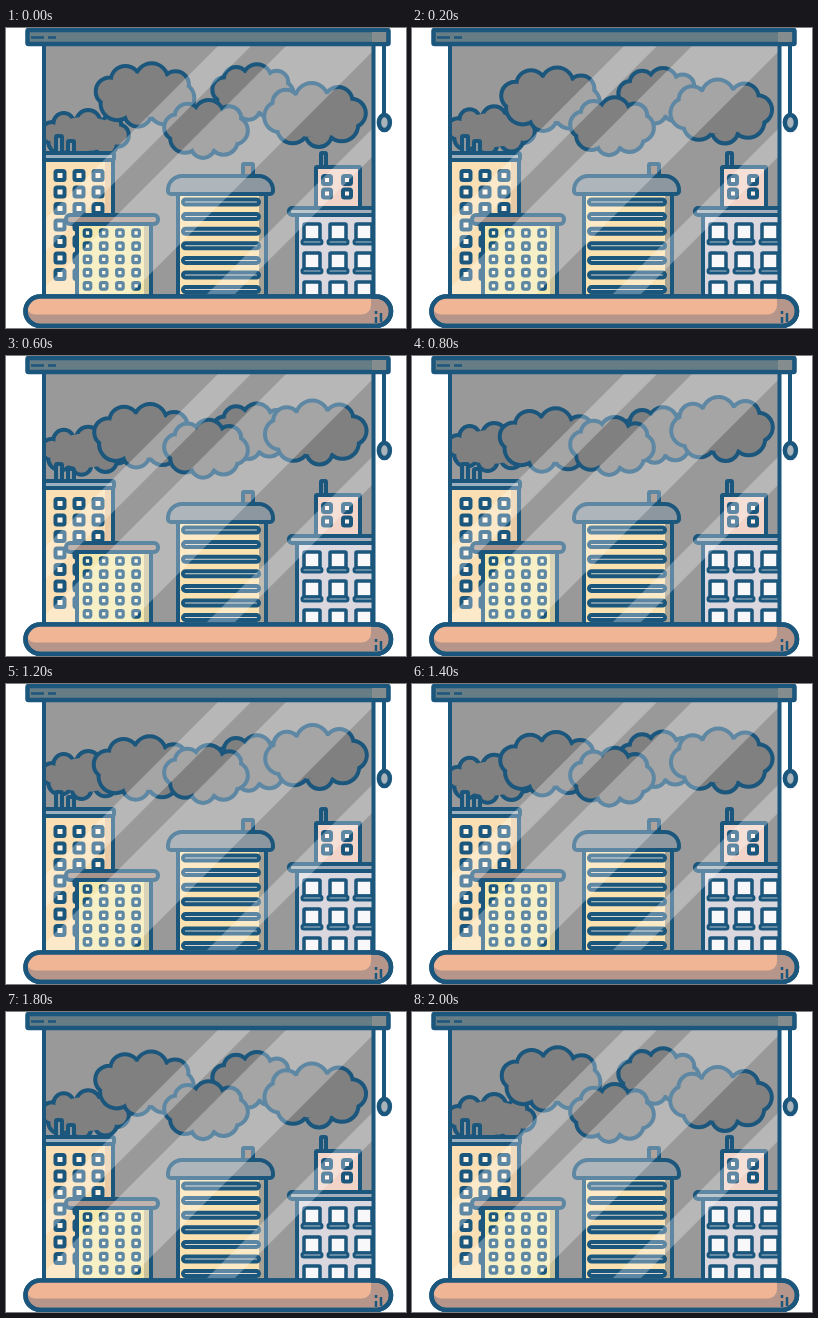
An HTML page with a canvas for the animation above (2.2 s loop, 400 px wide and 300 px high).

```html
<!DOCTYPE html>
<html lang="en">
<head>
<meta charset="utf-8">
<title>Smoggy window</title>
<style>
html, body { margin: 0; width: 100%; height: 100%; overflow: hidden; background: #fff; }
canvas { display: block; width: 400px; height: 300px; }
</style>
</head>
<body>
<canvas id="stage" width="400" height="300"></canvas>
<script>
const ctx = document.getElementById('stage').getContext('2d');
const INK = '#1b567d', SKY = '#999', SMOG = '#808080', ROOF = '#8c979f';
const STEP = 200, LOOP = 2200, TAU = Math.PI * 2;

// Centre, half width and half height; tilt turns the ring of lobes.
const clouds = [
  { x: 79, y: 106, w: 46, h: 26, tilt: 0.1, dx: 0, dy: -15 },
  { x: 247, y: 64, w: 43, h: 30, tilt: 0.15, dx: 0, dy: 15 },
  { x: 139, y: 67, w: 52, h: 34, tilt: 0.2, dx: -2, dy: 17 },
  { x: 309, y: 87, w: 53, h: 34, tilt: -0.1, dx: 1, dy: -14 },
  { x: 200, y: 101, w: 44, h: 31, tilt: 0.1, dx: 0, dy: -11 }
];

const rows = (start, gap, count) => Array.from({ length: count }, (_, i) => start + i * gap);

function ellipse(x, y, rx, ry) {
  ctx.moveTo(x + rx, y);
  ctx.ellipse(x, y, rx, ry, 0, 0, TAU);
}

// A cloud is a ring of eight overlapping lobes around a solid core.
function puff({ x, y, w, h, tilt }, inset, color) {
  ctx.beginPath();
  ellipse(x, y, w * 0.75, h * 0.65);
  for (const i of rows(0, 1, 8)) {
    const a = tilt + i * TAU / 8;
    const r = h * (0.5 + 0.05 * Math.sin(3 * a));
    ellipse(x + (w - r) * Math.cos(a), y + (h - r) * Math.sin(a), r - inset, r - inset);
  }
  ctx.fillStyle = color;
  ctx.fill();
}

function cloud(c, amount) {
  ctx.save();
  ctx.translate(c.dx * amount, c.dy * amount);
  puff(c, 0, INK);
  puff(c, 4, SMOG);
  ctx.restore();
}

function rect(x, y, w, h, color) {
  ctx.fillStyle = color;
  ctx.fillRect(x, y, w, h);
}

function box(x, y, w, h, fill, radius = 1, weight = 4) {
  ctx.beginPath();
  ctx.roundRect(x, y, w, h, radius);
  ctx.fillStyle = fill;
  ctx.fill();
  ctx.strokeStyle = INK;
  ctx.lineWidth = weight;
  ctx.stroke();
}

function line(x1, y1, x2, y2, weight = 4, color = INK) {
  ctx.beginPath();
  ctx.moveTo(x1, y1);
  ctx.lineTo(x2, y2);
  ctx.strokeStyle = color;
  ctx.lineWidth = weight;
  ctx.stroke();
}

function panes(xs, ys, size, fill, weight) {
  for (const y of ys)
    for (const x of xs)
      box(x - size / 2, y - size / 2, size, size, fill, 1.5, weight);
}

function tower() {
  box(50, 108, 6, 18, ROOF);
  box(62, 113, 6, 13, ROOF);
  box(36, 130, 71, 140, '#fbdfb4');
  rect(99, 134, 6, 134, '#e8cba6');
  box(34, 125, 74, 7, '#9db0bd', 2);
  panes(rows(54, 19, 3), rows(147.5, 16.5, 7), 9, '#fff4e4', 4);
}

function yellowBlock() {
  box(71, 192, 74, 80, '#f4e8ad');
  rect(138, 196, 5, 72, '#c9c29a');
  box(60, 187, 92, 9, '#a8938b', 4);
  panes(rows(81.5, 16.2, 4), rows(205, 13.2, 5), 6.5, '#fff8d5', 3.2);
}

function slatHouse() {
  box(237, 136, 10, 14, '#8c7c74');
  box(172, 164, 88, 110, '#fae1b0');
  rect(253, 168, 5, 104, '#a8a294');
  box(162, 148, 105, 18, ROOF, [14, 14, 3, 3]);
  for (const y of rows(171.5, 14.6, 7))
    box(177, y, 76, 5, '#d8d6cf', 2.5);
}

function whiteHouse() {
  box(315, 125, 5, 14, ROOF);
  box(310, 139, 44, 42, '#f1d3c8');
  panes([321, 341], [152, 165.5], 8, '#fff1ea', 4);
  box(291, 186, 82, 86, '#dad8de');
  box(283, 180, 90, 7, '#a3aeb8', 3);
  for (const y of rows(196, 29, 3))
    for (const x of rows(306, 26, 3)) {
      box(x - 8, y, 16, 16, '#f8f8fb', 1, 3.5);
      box(x - 10, y + 16, 20, 4, '#aebccb', 2, 3);
    }
}

// Diagonal glare between two values of x + y.
function glare(from, to) {
  ctx.beginPath();
  ctx.moveTo(from, 0);
  ctx.lineTo(to, 0);
  ctx.lineTo(to - 300, 300);
  ctx.lineTo(from - 300, 300);
  ctx.fillStyle = 'rgba(255,255,255,.29)';
  ctx.fill();
}

function frame() {
  line(38, 16, 38, 270);
  line(367.5, 16, 367.5, 270);
  box(21.5, 2, 361, 14, '#667d86', 1, 4.5);
  rect(366, 4, 14, 10, '#858c8e');
  line(25, 9.5, 38, 9.5, 2.5);
  line(42, 9.5, 50, 9.5, 2.5);
  line(378, 17, 378, 86);
  ctx.beginPath();
  ellipse(378.4, 94.5, 5.5, 7.5);
  ctx.fillStyle = '#a9b4ba';
  ctx.fill();
  ctx.strokeStyle = INK;
  ctx.lineWidth = 4.5;
  ctx.stroke();
}

function ledge() {
  box(19.5, 268.5, 365.5, 29.5, '#b6968a', 15, 4.5);
  ctx.save();
  ctx.clip();
  ctx.beginPath();
  ctx.roundRect(20, 268, 345, 18.5, [0, 0, 9, 9]);
  ctx.fillStyle = '#efb595';
  ctx.fill();
  ctx.restore();
  box(19.5, 268.5, 365.5, 29.5, 'transparent', 15, 4.5);
  line(370, 283, 370, 286, 2.5);
  line(370, 289, 370, 295, 2.5);
  line(375, 285, 375, 294, 2.5);
}

function draw(now) {
  const step = Math.floor((now % LOOP) / STEP);
  const amount = Math.min(Math.min(step, 10 - step) / 4, 1.07);
  rect(0, 0, 400, 300, '#fff');
  ctx.save();
  ctx.beginPath();
  ctx.rect(38, 17, 330, 252);
  ctx.clip();
  rect(38, 17, 330, 252, SKY);
  for (const c of clouds) cloud(c, amount);
  tower();
  yellowBlock();
  slatHouse();
  whiteHouse();
  glare(230, 263);
  glare(298, 390);
  glare(467, 495);
  ctx.restore();
  frame();
  ledge();
}

const start = performance.now();
function tick() {
  draw(performance.now() - start);
  requestAnimationFrame(tick);
}
tick();
</script>
</body>
</html>
```
